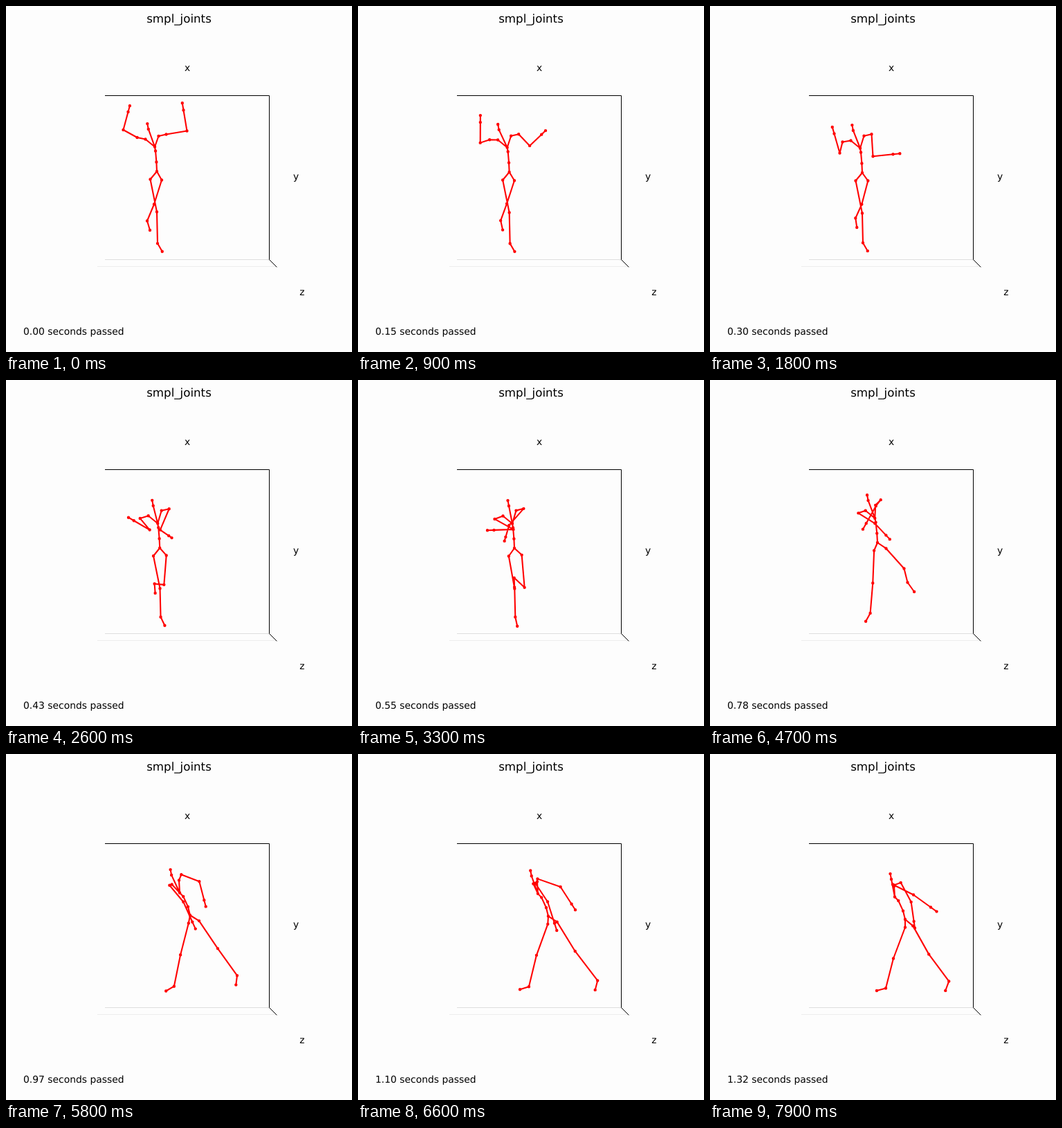
Write an HTML page that moves like this. It is 500 px wide and 500 px high and loops after 8 s.

```html
<!DOCTYPE html>
<html lang="en">
<head>
<meta charset="utf-8">
<title>smpl_joints</title>
<style>
  html, body { margin: 0; width: 100%; height: 100%; overflow: hidden; background: #fdfdfd; }
  svg { display: block; width: 100%; height: 100%; }
  text { font: 13.89px "DejaVu Sans", sans-serif; text-rendering: geometricPrecision; }
  .mid { text-anchor: middle; }
  .title { font-size: 16.67px; }
</style>
</head>
<body>
<svg viewBox="0 0 500 500">
  <rect width="500" height="500" fill="#fdfdfd"/>
  <g fill="none" stroke-linecap="square" transform="translate(.5 .5)">
    <path d="M143 366H380" stroke="#dedede"/>
    <path d="M132 376H391" stroke="#ededed"/>
    <path d="M143 129H380V366L390.5 376.5" stroke="#000"/>
  </g>
  <text class="mid title" x="250" y="24">smpl_joints</text>
  <text class="mid" x="262" y="94">x</text>
  <text class="mid" x="419" y="251">y</text>
  <text class="mid" x="428" y="418">z</text>
  <text id="clock" x="25" y="475"></text>
  <path id="bones" fill="none" stroke="red" stroke-width="2.08" stroke-linejoin="round"/>
  <path id="dots" fill="none" stroke="red" stroke-width="4.4" stroke-linecap="round"/>
</svg>
<script>
const STEP_MS = 100, STEPS = 80, STEPS_PER_SECOND = 60;
const beats = [0, 18, 33, 47, 58, 79];
const { PI, sin, cos, exp, min, max } = Math;

const mix = (a, b, u) => a + (b - a) * u;
const add = ([x, y], dx, dy) => [x + dx, y + dy];
const bump = (step, centre, width) => exp(-(((step - centre) / width) ** 2));

function ramp(step, start, end) {
  const u = min(1, max(0, (step - start) / (end - start)));
  return u * u * (3 - 2 * u);
}

// Smooth cubic through one point per beat.
function sway(step, ...keys) {
  const last = beats.length - 1;
  let i = 0;
  while (i < last - 1 && step >= beats[i + 1]) i++;
  const span = beats[i + 1] - beats[i];
  const u = (step - beats[i]) / span;

  return [0, 1].map(axis => {
    const secant = k => (keys[k + 1][axis] - keys[k][axis]) / (beats[k + 1] - beats[k]);
    const slope = k => {
      if (k === 0) return secant(0);
      if (k === last) return secant(last - 1);
      const before = beats[k] - beats[k - 1], after = beats[k + 1] - beats[k];
      return (secant(k - 1) * after + secant(k) * before) / (before + after);
    };
    return mix(keys[i][axis], keys[i + 1][axis], u * u * (3 - 2 * u))
      + span * u * (1 - u) * (slope(i) * (1 - u) - slope(i + 1) * u);
  });
}

function trunk(step) {
  const pelvis = sway(step, [218, 239], [220, 241], [226, 243], [242, 235], [266, 233], [282, 239]);
  const lean = ramp(step, 45, 58);
  const chest = add(pelvis, -3 - 12 * lean, -35.5 + 3 * lean);
  const neck = add(chest, -8.5 + 3.5 * cos(2 * PI * (step - 33) / 46), -25.6);
  const bow = 0.18 * (pelvis[0] - chest[0]);
  const vertebra = u => [mix(pelvis[0], chest[0], u) + bow, mix(pelvis[1], chest[1], u)];
  return { pelvis, chest, line: [pelvis, vertebra(0.38), vertebra(0.83), chest, neck, add(neck, -1.5, -7.8)] };
}

// The hand carries on in the direction of the forearm.
function arm(chest, collarOffset, shoulderOffset, upper, fore) {
  const collar = add(chest, ...collarOffset);
  const shoulder = add(collar, ...shoulderOffset);
  const elbow = add(shoulder, ...upper);
  const wrist = add(elbow, ...fore);
  return [chest, collar, shoulder, elbow, wrist, add(wrist, ...fore.map(v => v * 0.34))];
}

function rightArm(step, chest) {
  const drop = ramp(step, 50, 80);
  return arm(chest,
    [mix(-13.5, -1, drop), mix(-11, -17, drop)],
    [mix(-12, 10, ramp(step, 40, 82)), 4.5 * sin(PI * (step - 10) / 53)],
    sway(step, [-20, -11], [-4, 16], [27, 15], [24, 15], [20, 24], [15, 28]),
    sway(step, [7, -26], [-8, -28], [-28, 1], [16, 17], [13, 29], [4, 28]));
}

function leftArm(step, chest) {
  return arm(chest,
    [mix(5.5, -1, ramp(step, 33, 55)), -15.5 - 3.5 * sin(PI * step / 79)],
    [mix(11, -2, ramp(step, 30, 80)), -2.5 - 7 * bump(step, 53, 11)],
    sway(step, [30, -5], [2, 32], [-21, 24], [-7, 9], [26, 10], [30, 15]),
    sway(step, [-5, -30], [29, -3], [-5, 17], [-14, 25], [7, 27], [25, 18]));
}

function rightLeg(step, pelvis) {
  const hip = add(pelvis, mix(-9.5, 0, ramp(step, 20, 75)), 11.5);
  const knee = add(hip, mix(9.5, -17, ramp(step, 28, 70)), mix(47, 45, ramp(step, 47, 66)));
  const ankle = add(knee, mix(1, -11, ramp(step, 33, 66)), 43.3 + 2.3 * cos(2 * PI * step / 62));
  const toe = mix(60, 165, ramp(step, 20, 70)) * PI / 180;
  return [pelvis, hip, knee, ankle, add(ankle, 13.5 * cos(toe), 13.5 * sin(toe))];
}

function leftLeg(step, pelvis) {
  const turn = cos(PI * step / 58);
  const hip = add(pelvis, 10 - 3 * turn, 10.3 + 2.2 * turn);
  const knee = add(hip, ...sway(step, [-11, 35], [-9, 34], [4, 47], [26, 29], [27, 40], [23, 41]));
  const ankle = add(knee, ...sway(step, [-10, 24], [-9, 20], [-15, -14], [5, 20], [28, 39], [29, 39]));
  return [pelvis, hip, knee, ankle, add(ankle, 4 - 9 * step / 79 + 11 * bump(step, 47, 7), 13.5)];
}

const [bones, dots, clock] = ['bones', 'dots', 'clock'].map(id => document.getElementById(id));
const coords = point => point.map(v => v.toFixed(2)).join(' ');

function draw(step) {
  const { pelvis, chest, line } = trunk(step);
  const limbs = [line, rightArm(step, chest), leftArm(step, chest), rightLeg(step, pelvis), leftLeg(step, pelvis)];
  bones.setAttribute('d', limbs.map(limb => 'M' + limb.map(coords).join('L')).join(''));
  dots.setAttribute('d', limbs.flat().map(joint => `M${coords(joint)}h0`).join(''));
  clock.textContent = (step / STEPS_PER_SECOND).toFixed(2) + ' seconds passed';
}

const start = performance.now();
function tick() {
  draw(Math.floor((performance.now() - start) / STEP_MS) % STEPS);
  requestAnimationFrame(tick);
}
tick();
</script>
</body>
</html>
```
